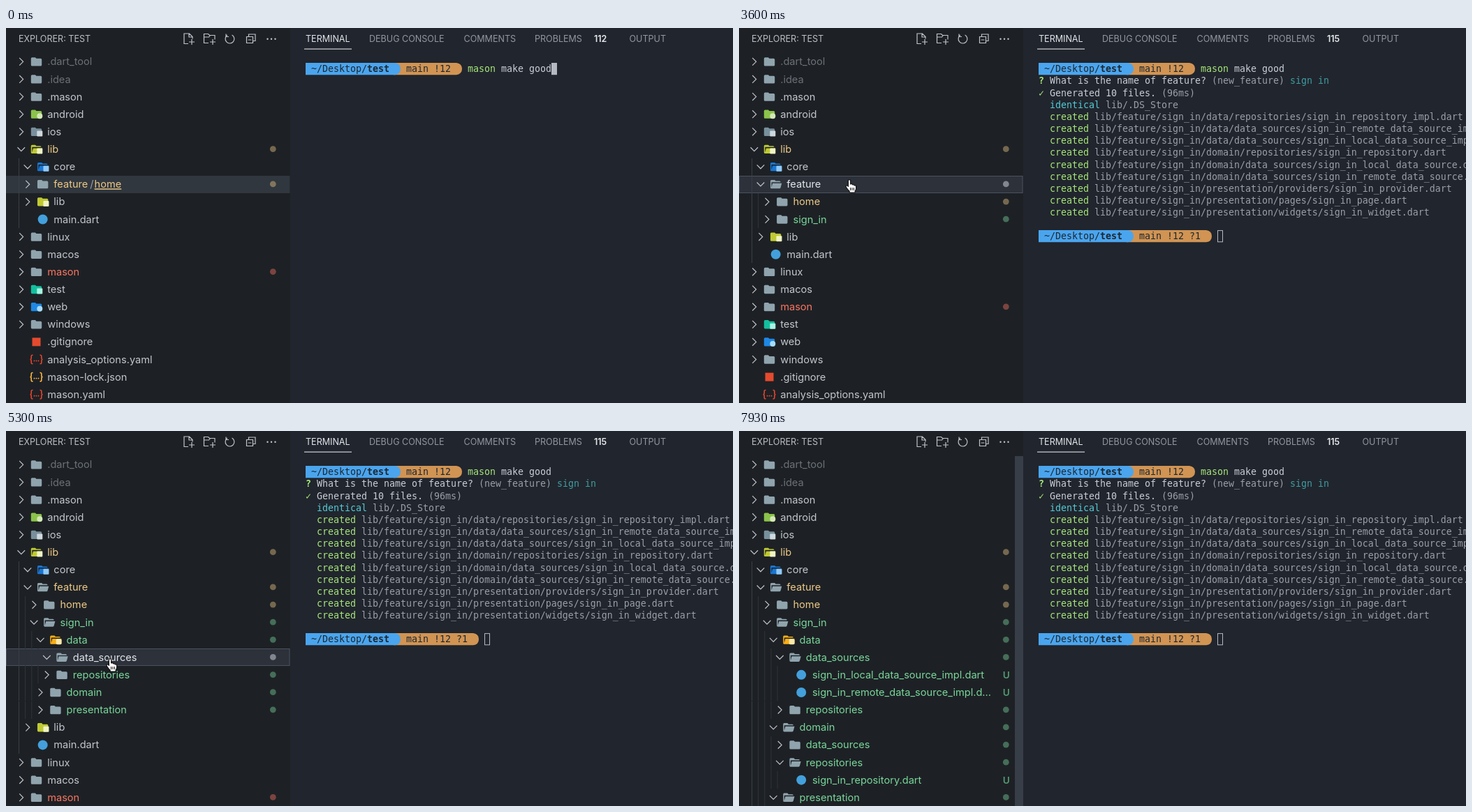
Animation of 1041x538 px, one loop 8000 ms. Source, as an HTML page:

```html
<!DOCTYPE html>
<html lang="en">
<head>
<meta charset="utf-8">
<title>Feature generator</title>
<style>
html, body { margin: 0; width: 100%; height: 100%; overflow: hidden; background: #21252d; }
svg { display: block; }
text { white-space: pre; }
.ui { font: 12.55px Inter, sans-serif; }
.tree { font: 14.6px Inter, sans-serif; }
.term { font: 13.29px "DejaVu Sans Mono", monospace; }
</style>
</head>
<body>
<svg id="stage" width="1041" height="538" viewBox="0 0 1041 538">
  <rect width="1041" height="538" fill="#21252d"/>
  <rect width="407" height="538" fill="#1d2125"/>
  <g id="tree"></g>
  <g id="head" class="ui"></g>
  <g id="term" class="term"></g>
  <rect id="bar" x="395" y="36" width="12" height="502" fill="#383e47"/>
  <g id="hand" stroke="#111" stroke-linejoin="round">
    <path fill="#fff" stroke-width="1.2" d="M-1.6 1.2Q-1.6-.4 0-.4T1.7 1.2V6Q4.1 5 4.6 6.9Q6.7 6 7.2 8Q9.6 7.2 9.7 9.600V12Q9.4 14.6 8.2 16V18H.1V16.2Q-2.7 13.4-4.8 10Q-5.2 8-3.4 8Q-2.4 8-1.6 9.4Z"/>
    <path d="M1.600 11v4M4 11v4M6.400 11v4"/>
  </g>
</svg>
<script>
const LOOP = 8000, ROW = 25.13, TOP = 48.3, STEP = 9.14, LOAD = 70;
const $ = id => document.getElementById(id);

const C = {
  plain: '#c3c7ce', dim: '#6c7178', mod: '#edc887', fresh: '#7ad69b', bad: '#fa7561',
  white: '#e2e5ea', green: '#a6e67a', gray: '#999fa8', cyan: '#52cbd6', teal: '#3f9ca1',
  blue: '#4aa5ee', orange: '#d19453', ink: '#1d2731', text: '#c8cdd6'
};

const FOLDER = 'M10 4H4a2 2 0 0 0-2 2v12a2 2 0 0 0 2 2h16a2 2 0 0 0 2-2V8a2 2 0 0 0-2-2h-8z';
const OPEN = 'M19 20H4a2 2 0 0 1-2-2V6a2 2 0 0 1 2-2h6l2 2h7a2 2 0 0 1 2 2H4v10l2.1-8h17.1l-2.3 8.5a2 2 0 0 1-1.9 1.5z';

// kind: [folder colour, badge colour, badge corner radius]
const FOLDERS = {
  folder: ['#90a4ae'], android: ['#8bc34a', '#d3e8b6', 4], ios: ['#78909c', '#cfd8dc', 1],
  lib: ['#c0ca33', '#f0f4c3', 1], core: ['#1976d2', '#90caf9', 1], test: ['#13bf9f', '#a7f5e2', 1],
  web: ['#1e88e5', '#a8dcfb', 4], data: ['#fbb018', '#ffe9a8', 2]
};

// opened: time of the click that opens a folder; 0 means already open
const node = (name, kind = 'folder', tone = 'plain', opened = Infinity, kids = []) =>
  ({ name, kind, tone, opened, kids });
const fresh = (name, opened, kids, kind) => node(name, kind, 'fresh', opened, kids);
const dart = name => node(name, 'dart', 'fresh');

const signIn = fresh('sign_in', 4290, [
  fresh('data', 4720, [
    fresh('data_sources', 5255, [
      dart('sign_in_local_data_source_impl.dart'),
      dart('sign_in_remote_data_source_impl.d...')]),
    fresh('repositories')], 'data'),
  fresh('domain', 5600, [
    fresh('data_sources'),
    fresh('repositories', 5960, [dart('sign_in_repository.dart')])]),
  fresh('presentation', 6450)
]);
const feature = node('feature', 'folder', 'mod', 3480, [node('home', 'folder', 'mod'), signIn]);
const roots = [
  node('.dart_tool', 'folder', 'dim'), node('.idea', 'folder', 'dim'), node('.mason'),
  node('android', 'android'), node('ios', 'ios'),
  node('lib', 'lib', 'mod', 0, [node('core', 'core', 'plain', 0), feature, node('lib', 'lib'), node('main.dart', 'dart')]),
  node('linux'), node('macos'), node('mason', 'folder', 'bad'), node('test', 'test'),
  node('web', 'web'), node('windows'), node('.gitignore', 'git'),
  node('analysis_options.yaml', 'yaml'), node('mason-lock.json', 'json'), node('mason.yaml', 'yaml')
];

// pointer tip: time, x, y
const PATH = [
  [2830, 990, 525], [2950, 330, 275], [3000, 231, 233], [3350, 158, 218], [3600, 158, 218],
  [4130, 143, 268], [4400, 143, 268], [4690, 146, 293], [4850, 146, 293], [5180, 149, 327],
  [5340, 149, 327], [5560, 149, 419], [5620, 149, 419], [5750, 149, 470], [6080, 149, 470],
  [6400, 149, 519], [6520, 150, 519], [6750, 152, 565]
];

function pointer(t) {
  const i = PATH.findIndex(p => p[0] > t);
  if (i < 1) return null;
  const [t0, x0, y0] = PATH[i - 1], [t1, x1, y1] = PATH[i];
  const u = (t - t0) / (t1 - t0), e = u * u * (3 - 2 * u);
  return { x: x0 + (x1 - x0) * e, y: y0 + (y1 - y0) * e };
}

const rect = (x, y, w, h, fill, more = '') =>
  `<rect x="${x}" y="${y}" width="${w}" height="${h}" fill="${fill}" ${more}/>`;
const stroke = (d, color, w = 1.2) => `<path d="${d}" fill="none" stroke="${color}" stroke-width="${w}"/>`;
const label = (x, y, s, fill, more = '') => `<text x="${x}" y="${y}" fill="${fill}" ${more}>${s}</text>`;

function icon(kind, open, x, y) {
  const at = `<g transform="translate(${x} ${y})">`;
  if (kind === 'dart') return at + '<circle r="7" fill="#43a0dc"/></g>';
  if (kind === 'git') return at + rect(-6, -6, 12, 12, '#e64a2e') + '</g>';
  if (kind === 'yaml' || kind === 'json') {
    const color = kind === 'yaml' ? '#e3452f' : '#fbb444';
    return at + stroke('M-5-6.2h-.6q-1.7 0-1.7 1.7v2.3Q-7.3 0-9 0q1.7 0 1.7 2.2v2.3q0 1.7 1.7 1.7h.6' +
      'M5-6.2h.6q1.7 0 1.7 1.7v2.3Q7.3 0 9 0q-1.7 0-1.7 2.2v2.3q0 1.7-1.7 1.7h-.6', color, 1.6) +
      [-3, 0, 3].map(dx => `<circle cx="${dx}" cy="2" r=".95" fill="${color}"/>`).join('') + '</g>';
  }
  const [color, badge, r] = FOLDERS[kind];
  return at + `<path transform="scale(.77) translate(-12 -12)" d="${open ? OPEN : FOLDER}" fill="${color}"/>` +
    (badge ? rect(.8, -1.4, 8, 8, badge, `rx="${r}"`) : '') + '</g>';
}

function visibleRows(t, list = roots, depth = 0, out = []) {
  for (const n of list) {
    out.push({ n, depth });
    if (n.opened === 0 || t >= n.opened + LOAD) visibleRows(t, n.kids, depth + 1, out);
  }
  return out;
}

function drawTree(t) {
  const rows = visibleRows(t), focused = t >= 3480;
  const clicked = rows.filter(r => r.n.opened > 0 && r.n.opened <= t).sort((a, b) => b.n.opened - a.n.opened)[0];
  const selected = t >= 6850 ? null : focused ? clicked.n : feature;
  const tip = pointer(t - 35);
  const hover = tip && tip.x < 407 ? Math.floor((tip.y - TOP) / ROW + .5) : -1;

  return rows.slice(0, 20).map(({ n, depth }, i) => {
    const y = TOP + i * ROW, x = depth * STEP, top = Math.round(y - ROW / 2);
    const open = t >= n.opened, isFile = ['dart', 'git', 'yaml', 'json'].includes(n.kind);
    const active = n === selected && focused;
    const color = active ? C.white : C[n.tone];
    let s = '';
    if (n === selected) {
      s += rect(0, top, 406.5, 25, focused ? '#2c313a' : '#30373e');
      if (focused) s += rect(.5, top + .5, 405.5, 24, 'none', 'stroke="#4b525f"');
    } else if (i === hover) s += rect(0, top, 406.5, 25, '#2a2e37');
    for (let d = 0; d < depth; d++) s += rect(18 + d * STEP, top, 1, ROW, d ? '#30353b' : '#3b4046');
    if (!isFile) s += stroke(open ? `M${x + 16.5} ${y - 2.7}l5.3 5.4 5.3-5.4` : `M${x + 19.2} ${y - 5.4}l5.4 5.4-5.4 5.4`, '#c0c4cb');
    s += icon(n.kind, open, x + 43.5, y);
    if (n === feature && t < 2530) {
      s += label(x + 59.2, y + 5.1, 'feature', color) + label(120.3, y + 5.1, '/', C.gray) +
        label(126.6, y + 5.1, 'home', color, 'text-decoration="underline"');
    } else s += label(x + 59.2, y + 5.1, n.name, color);
    if (n.kind === 'dart' && n.tone === 'fresh') s += label(377.8, y + 5, 'U', '#559a70', 'font-size="13.6" font-weight="600"');
    else if (['mod', 'fresh', 'bad'].includes(n.tone))
      s += `<circle cx="382.3" cy="${y - .3}" r="4.4" fill="${active ? '#82868e' : color}" opacity="${active ? 1 : .43}"/>`;
    return s;
  }).join('');
}

function drawHead(t) {
  const tab = (x, s, color = '#9197a0') => label(x, 20.2, s, color);
  const ink = '#c0c4cb';
  return tab(18, 'EXPLORER: TEST', '#bbbfc6') +
    stroke('M261 22.5h-6V8h7.5l4.5 4.5v3M262 8v5h5M266 16v8M262 20h8', ink) +
    stroke('M290 21.5h-6.5V8.5h6l2 2h7.5v6M283.5 13h7l2-2.5M296 16v8M292 20h8', ink) +
    stroke('M317 10.2A6.4 6.4 0 1 0 323.6 10M315 8.5v4h4', ink) +
    stroke('M344.5 12.5h9v9h-9zM347.5 12V9h9.5v9.5h-3M346.7 17h4.7', ink) +
    [374.5, 380, 385.5].map(x => `<circle cx="${x}" cy="15.8" r="1.2" fill="${ink}"/>`).join('') +
    tab(429, 'TERMINAL', '#e2e5ea') + rect(427, 29.5, 68, 1.2, '#d0d3d8') +
    tab(520, 'DEBUG CONSOLE') + tab(655.5, 'COMMENTS') + tab(757, 'PROBLEMS') +
    label(842, 19.8, t < 2540 ? '112' : '115', '#e6e8ec', 'font-size="12.5" font-weight="600"') + tab(892.5, 'OUTPUT');
}

const colX = c => 429 + c * 8, lineY = l => 58.6 + l * 17.15;
const put = (col, line, s, color, more) => label(colX(col), lineY(line) + 4.7, s, color, more);

function prompt(line, status) {
  const y = lineY(line) - 8.6, end = 565 + (status.length + 2) * 8;
  const pill = (x, to, color) =>
    `<path d="M${x} ${y}H${to}q8 1 8 8.6t-8 8.6H${x}z" fill="${color}"/>`;
  return pill(555, end, C.orange) + pill(429, 557, C.blue) +
    put(1, line, '~/Desktop/<tspan font-weight="bold">test</tspan>', C.ink) + put(18, line, status, C.ink);
}

const PLACES = ['data/repositories/sign_in_repository_impl', 'data/data_sources/sign_in_remote_data_source_impl',
  'data/data_sources/sign_in_local_data_source_impl', 'domain/repositories/sign_in_repository',
  'domain/data_sources/sign_in_local_data_source', 'domain/data_sources/sign_in_remote_data_source',
  'presentation/providers/sign_in_provider', 'presentation/pages/sign_in_page', 'presentation/widgets/sign_in_widget'];

function drawTerminal(t) {
  let s = prompt(0, 'main !12') + put(29, 0, 'mason', C.green) + put(35, 0, 'make good', C.text);
  let cursor = [44, 0];
  if (t >= 500) cursor = [0, 1];
  if (t >= 630) {
    const typed = 'sign in'.slice(0, Math.max(0, Math.floor((t - 1000) / 82) + 1));
    s += put(0, 1, '?', C.green, 'font-weight="bold"') + put(2, 1, 'What is the name of feature?', C.text) +
      put(31, 1, '(new_feature)', C.gray) + put(45, 1, typed, t < 1730 ? C.text : C.teal);
    cursor = t < 1730 ? [45 + typed.length, 1] : [0, 2];
  }
  if (t >= 1900) {
    s += put(0, 2, '✓', C.green) + put(2, 2, 'Generated 10 files.', C.text) + put(22, 2, '(96ms)', C.gray) +
      put(2, 3, 'identical', C.cyan) + put(12, 3, 'lib/.DS_Store', C.gray);
    PLACES.forEach((p, i) => {
      s += put(2, 4 + i, 'created', C.green) + put(10, 4 + i, `lib/feature/sign_in/${p}.dart`, C.gray);
    });
    cursor = [0, 13];
  }
  if (t >= 2070) {
    s += prompt(14, 'main !12 ?1');
    cursor = [32, 14];
  }
  const x = colX(cursor[0]), y = lineY(cursor[1]) - 8.6;
  return s + (t < 3480 ? rect(x, y, 8, 17.2, '#b4b9c3') :
    rect(x + .5, y + .5, 7, 16.2, 'none', 'stroke="#b4b9c3"'));
}

const cache = {};
function fill(id, markup) {
  if (cache[id] !== markup) $(id).innerHTML = cache[id] = markup;
}

function render(t) {
  fill('tree', `<g class="tree">${drawTree(t)}</g>`);
  fill('head', drawHead(t));
  fill('term', drawTerminal(t));
  $('bar').setAttribute('opacity', Math.min(1, Math.max(0, (t - 7170) / 100)));
  const p = pointer(t), shown = p && p.x < 407;
  $('hand').setAttribute('visibility', shown ? 'visible' : 'hidden');
  if (shown) $('hand').setAttribute('transform', `translate(${p.x} ${p.y})`);
}

const start = performance.now();
function tick() {
  render((performance.now() - start) % LOOP);
  requestAnimationFrame(tick);
}
tick();
</script>
</body>
</html>
```
